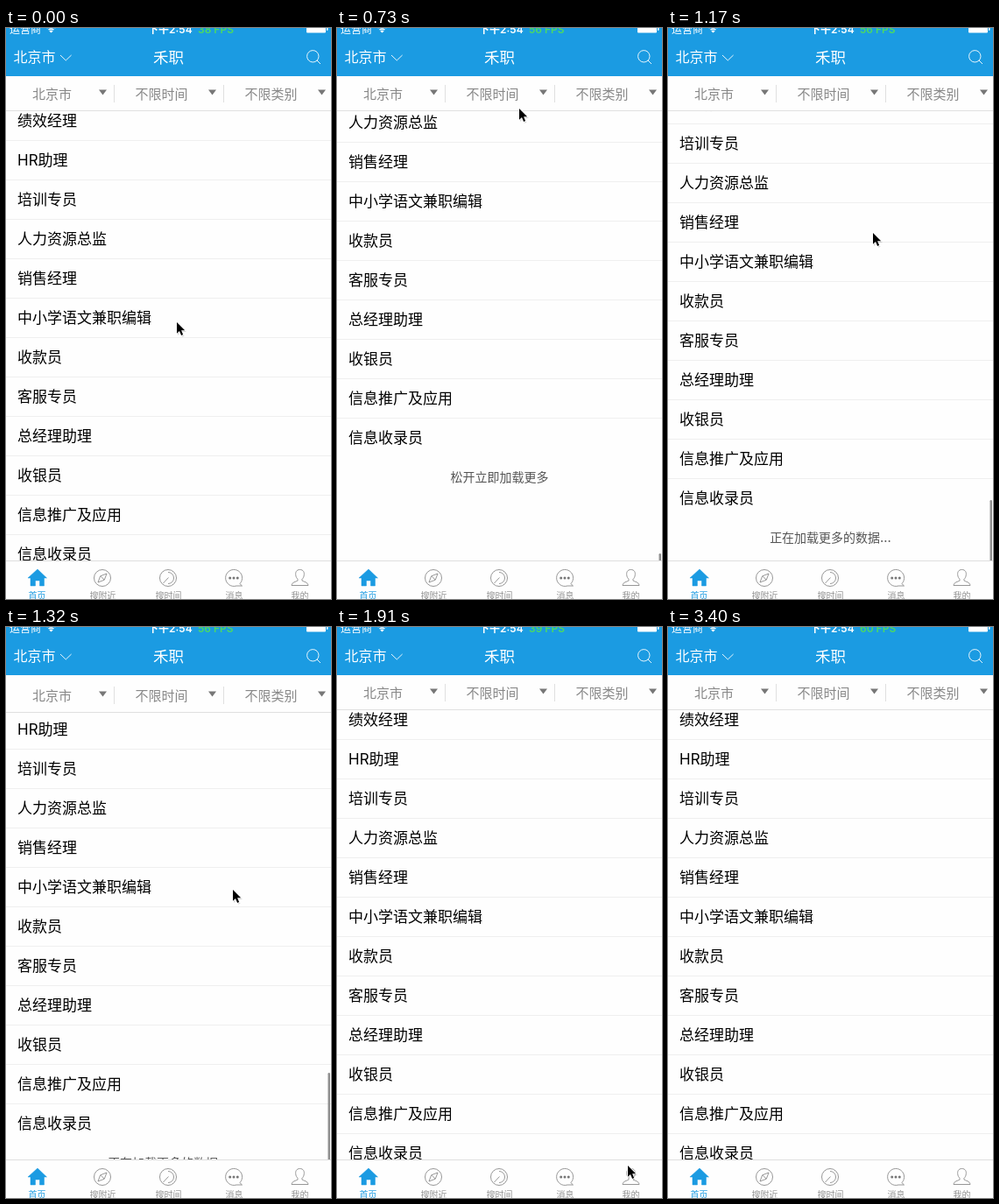
Animation of 371 by 652 pixels, one loop 3.5 s. Source, as an HTML page:

```html
<!DOCTYPE html>
<html lang="zh-CN">
<head>
<meta charset="utf-8">
<style>
  html, body { margin: 0; width: 100%; height: 100%; overflow: hidden; background: #fff; }
  svg { display: block; width: 371px; height: 652px; }
  text { font-family: Inter, "Noto Sans CJK SC", "Noto Sans CJK", sans-serif; }
  .mid { text-anchor: middle; }
  .row { font-size: 17px; fill: #000; }
  .more { font-size: 14px; font-weight: 500; fill: #555; }
  .filter { font-size: 15px; fill: #888; }
  .status { font-size: 12px; fill: #fff; }
  .bold { font-weight: 600; }
  .tab { font-size: 10px; fill: #929292; }
  .tab:first-child { fill: #1b9be2; font-weight: 500; }
  .icon { fill: none; stroke: #8c8c8c; stroke-width: .9; }
</style>
</head>
<body>
<svg viewBox="0 0 371 652">
  <defs>
    <clipPath id="page"><rect y="55" width="371" height="554"/></clipPath>
  </defs>
  <rect width="371" height="652" fill="#fefefe"/>

  <g clip-path="url(#page)">
    <g id="list">
      <g id="upper"></g>
      <g id="lower"></g>
      <text id="more" class="more mid" x="185.5" y="455"></text>
    </g>
    <rect id="thumb" x="367.5" width="2.5" rx="1.2" fill="#8f8f8f"/>
    <g id="bar">
      <rect y="55" width="371" height="39" fill="#fefefe"/>
      <path d="M0 94.5H371M123.5 65V85M248.5 65V85" stroke="#e0e0e0"/>
    </g>
  </g>

  <rect width="371" height="55" fill="#1b9be2"/>
  <text class="status" x="4" y="5.5">运营商</text>
  <path d="M46.5 0Q51.5 -3.5 56.5 0M48.5 2Q51.5 0 54.5 2" fill="none" stroke="#fff" stroke-width="1.5"/>
  <path d="M49.3 3.4Q51.5 1.8 53.7 3.4L51.5 5.6Z" fill="#fff"/>
  <text class="status bold" x="162" y="6">下午2:54</text>
  <text id="fps" class="status bold" x="219" y="6" style="fill:#4cd964"></text>
  <path d="M343 0H365V4.5Q365 5.5 364 5.5H344Q343 5.5 343 4.5ZM366 0H367.5V2.5L366 3Z" fill="#fff"/>
  <text x="8.5" y="39" font-size="16" fill="#fff">北京市</text>
  <text class="mid" x="185.5" y="39.5" font-size="17.5" fill="#fff">禾职</text>
  <g fill="none" stroke="#fff" stroke-width=".9">
    <path d="M62 31L68.3 37L74.6 31M355 37L359 41"/>
    <circle cx="350.3" cy="32.3" r="6.7"/>
  </g>

  <rect y="608" width="371" height="44" fill="#fefefe"/>
  <path d="M0 608.5H371" stroke="#dedede"/>
  <path d="M36 618L46.5 628H43.5V637H38.5V631H33.5V637H28V628H25Z" fill="#1b9be2" stroke="#1b9be2" stroke-width=".5" stroke-linejoin="round"/>
  <g class="icon">
    <circle cx="110" cy="628" r="9.5"/>
    <path d="M115 623L112.3 630.2L105 633L107.7 625.8ZM108.3 626.2L112 629.8"/>
    <circle cx="185" cy="628" r="9.5"/>
    <path d="M185 621.5A6.5 6.5 0 0 1 185 634.5M185.5 627.5L179.5 634"/>
    <path d="M267 634.5A9.5 9.5 0 1 0 263 637H269.5Q268 636 267 634.5Z"/>
    <path d="M335.5 618.5C331.5 618.5 330.3 621.5 330.7 624.5C331 627 332 628.5 333 629.3V631C331 632.5 326.5 632.5 326 636.5H345C344.5 632.5 340 632.5 338 631V629.3C339 628.5 340 627 340.3 624.5C340.7 621.5 339.5 618.5 335.5 618.5Z"/>
  </g>
  <path d="M255.7 628h0m4.3 0h0m4.3 0h0" stroke="#777" stroke-width="3" stroke-linecap="round"/>
  <g id="tabs"></g>

  <g id="cursor">
    <path d="M1 2V15L4 12L6.2 16.8L8.5 15.8L6.4 11H11Z" fill="#000" opacity=".15"/>
    <path d="M0 0V12.8L3 10L5.1 14.9L7.1 14L5.1 9.3H9.2Z" fill="#000" stroke="#fff" stroke-width="1.6" paint-order="stroke"/>
  </g>
</svg>
<script>
const $ = id => document.getElementById(id);

function add(parent, tag, attrs, label = '') {
  const el = document.createElementNS('http://www.w3.org/2000/svg', tag);
  for (const key in attrs) el.setAttribute(key, attrs[key]);
  el.textContent = label;
  $(parent).append(el);
}

const jobs = ['高薪客服', '绩效经理', 'HR助理', '培训专员', '人力资源总监', '销售经理',
  '中小学语文兼职编辑', '收款员', '客服专员', '总经理助理', '收银员', '信息推广及应用', '信息收录员'];

// List coordinates start at the centre of the fourth row.
jobs.forEach((job, i) => {
  const y = (i - 3) * 45, group = i < 2 ? 'upper' : 'lower';
  add(group, 'text', { class: 'row', x: 13, y: y + 6.3 }, job);
  if (i < jobs.length - 1) add(group, 'path', { d: `M0 ${y + 22.5}H371`, stroke: '#efefef' });
});

['北京市', '不限时间', '不限类别'].forEach((label, i) => {
  const x = 52.5 + i * 125;
  add('bar', 'text', { class: 'filter mid', x, y: 80.7 }, label);
  add('bar', 'path', { d: `M${x + 53.5} 70.5h9l-4.5 6z`, fill: '#777' });
});

['首页', '搜附近', '搜时间', '消息', '我的'].forEach((label, i) =>
  add('tabs', 'text', { class: 'tab mid', x: 35.5 + i * 75, y: 651.7 }, label));

// The picture is refreshed in ticks; all motion below is measured in them.
const LOOP = 3500, TICK = 146.6, LEAD = 6;
const PULL = 2, LOAD = 6, GLIDE = 9, REST = 11, LEAVE = 18;
const TOP = 196, LOADING_Y = 100, REACH = 133;

const progress = (k, from, to) => Math.min(1, Math.max(0, (k - from) / (to - from)));
const easeOut = u => 1 - (1 - u) ** 2.4;
const easeInOut = u => (1 - Math.cos(Math.PI * u ** 1.02)) / 2;

// Pull up against the end, snap to the loading inset, then drag back down.
function listY(k) {
  if (k < LOAD) return Math.round(TOP - REACH * easeOut(progress(k, PULL, 5)));
  return Math.round(LOADING_Y + (TOP - LOADING_Y) * easeInOut(progress(k, LOAD, REST)));
}

// Pointer turns: tick, x, y and the power of the easing that leads there
const turns = [[0, 195, 336], [1, 184, 400], [3, 202, 153, 3], [5, 208, 92], [7, 208, 92],
  [8, 234, 234], [10, 283, 366], [12, 319, 588, 1.6], [13, 332, 615], [17, 340, 652, .75]];

function pointer(k) {
  const i = turns.findIndex(turn => turn[0] >= k);
  if (i < 1) return turns.at(i).slice(1, 3);
  const [from, x, y] = turns[i - 1];
  const [to, nextX, nextY, power = 1] = turns[i];
  const u = progress(k, from, to) ** power;
  return [x + (nextX - x) * u, y + (nextY - y) * u].map(Math.round);
}

const rates = [[0, 38], [3, 56], [REST, 39], [16, 58], [23, 60]];

const move = (id, x, y) => $(id).setAttribute('transform', `translate(${x} ${y})`);

function draw(t) {
  const k = Math.floor((t + LEAD) / TICK);
  const y = listY(k);
  const gap = k >= GLIDE && k < REST ? 3 : 0;
  move('list', 0, y);
  move('bar', 0, gap);
  move('upper', 0, -gap);
  move('cursor', ...pointer(k));
  $('cursor').style.display = k < LEAVE ? '' : 'none';

  const top = k <= PULL || k > GLIDE ? 609 : k < LOAD ? 600 : 671 - y;
  $('thumb').setAttribute('y', top);
  $('thumb').setAttribute('height', 609 - top);
  $('more').textContent = k < LOAD ? '松开立即加载更多' : '正在加载更多的数据...';
  $('fps').textContent = rates.findLast(rate => rate[0] <= k)[1] + ' FPS';
}

const start = performance.now();
function tick() {
  draw((performance.now() - start) % LOOP);
  requestAnimationFrame(tick);
}
tick();
</script>
</body>
</html>
```
